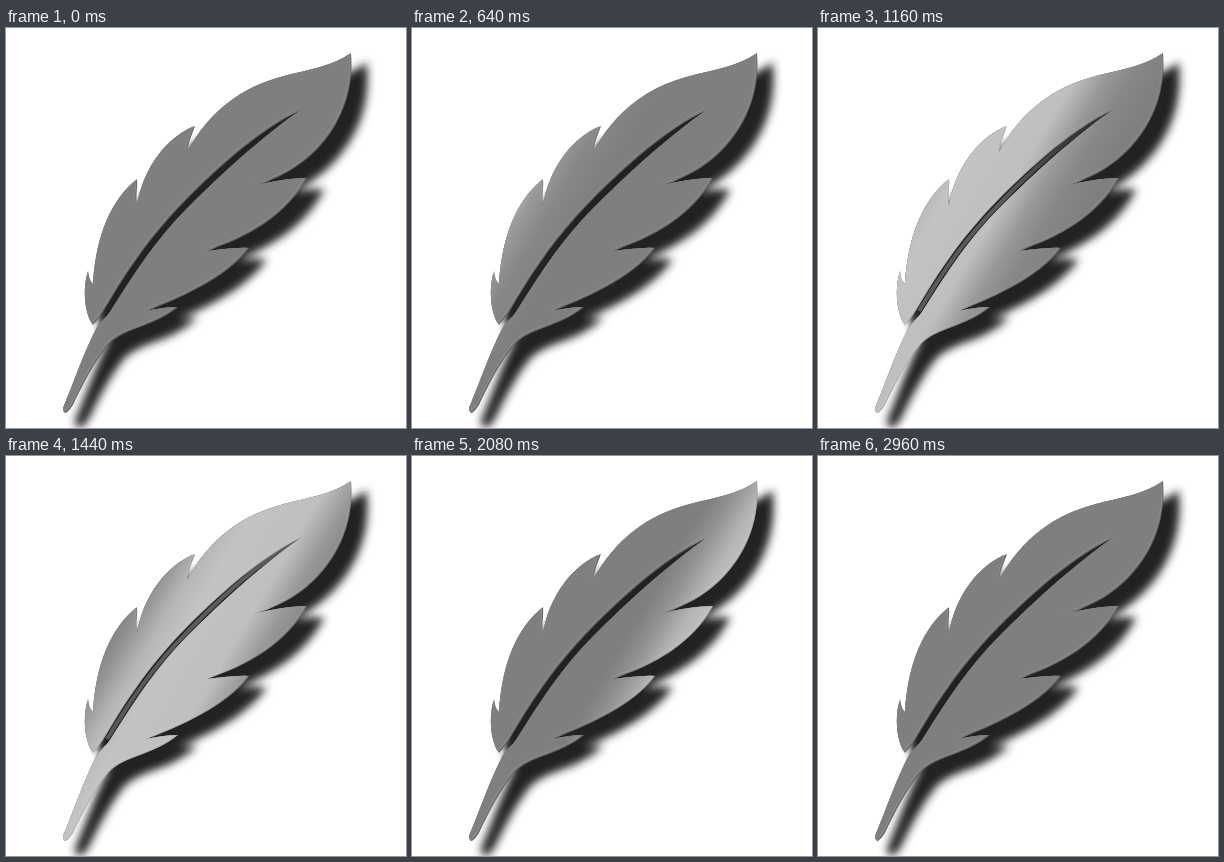
An HTML page that plays this animation: 400 px wide and 400 px high, repeating every 3 s.

```html
<!DOCTYPE html>
<html lang="en">
<head>
<meta charset="utf-8">
<title>Feather</title>
<style>
  html, body { margin: 0; width: 100%; height: 100%; overflow: hidden; background: #fff; }
  svg { display: block; width: 100vw; height: 100vh; }
</style>
</head>
<body>
<svg viewBox="0 0 400 400">
  <defs>
    <path id="feather" d="
      M345 25
      C327 38 301 42 278 48 C236 59 204 82 181 124
      C182 115 186 107 189 98 C162 108 137 139 131 178
      C129 169 132 161 131 151 C106 171 90 206 87 256
      C83 252 83 247 82 243 C76 263 79 286 87 297
      C91 293 94 288 97 284 C117 250 137 219 165 188
      C203 147 250 104 296 81
      C257 108 209 151 170 192 C141 224 122 256 104 284
      C99 291 94 294 90 301 C79 322 69 351 57 380
      Q57 385 60 385 Q64 382 67 377 C77 356 88 334 103 316
      C118 300 148 299 172 279
      C161 279 150 281 140 283 C170 272 220 251 243 220
      C228 219 214 222 200 223 C242 210 282 186 301 150
      C283 150 264 154 246 158 C303 145 351 93 345 25Z"/>
    <clipPath id="inside"><use href="#feather"/></clipPath>
    <filter id="soft" filterUnits="userSpaceOnUse" x="0" y="0" width="400" height="400">
      <feGaussianBlur stdDeviation="4.5"/>
    </filter>
    <linearGradient id="light" gradientUnits="userSpaceOnUse"></linearGradient>
  </defs>
  <rect width="400" height="400" fill="#fff"/>
  <use href="#feather" transform="translate(14 13)" fill="#222" stroke="#222" stroke-width="4" filter="url(#soft)"/>
  <path d="M296 81C253 106 206 149 168 190C139 222 120 252 101 283" fill="none"
        stroke="url(#light)" stroke-width="4" opacity=".5"/>
  <use href="#feather" fill="#686868"/>
  <g clip-path="url(#inside)">
    <use href="#feather" transform="translate(-1 -1)" fill="#8a8a8a"/>
    <use href="#feather" transform="translate(-2 -2)" fill="#7f7f7f"/>
  </g>
  <use href="#feather" fill="url(#light)"/>
</svg>
<script>
  const LOOP = 3000;
  const REACH = 110;
  const light = document.getElementById("light");

  // Distance from the band centre and strength of the light there.
  const profile = [[-80, 0], [-60, .16], [-38, .43], [-15, .53], [35, .5], [60, .2], [80, .07], [REACH, 0]];

  for (const [distance, strength] of profile) {
    const stop = document.createElementNS("http://www.w3.org/2000/svg", "stop");
    stop.setAttribute("offset", (distance + REACH) / (2 * REACH));
    stop.setAttribute("stop-color", "#fff");
    stop.setAttribute("stop-opacity", strength);
    light.append(stop);
  }

  function placeEnd(index, distance) {
    light.setAttribute("x" + index, .874 * distance);
    light.setAttribute("y" + index, .514 * distance);
  }

  function draw(time) {
    const centre = 27 + .157 * (time % LOOP);
    placeEnd(1, centre - REACH);
    placeEnd(2, centre + REACH);
  }

  function tick(now) {
    draw(now);
    requestAnimationFrame(tick);
  }

  draw(0);
  requestAnimationFrame(tick);
</script>
</body>
</html>
```
